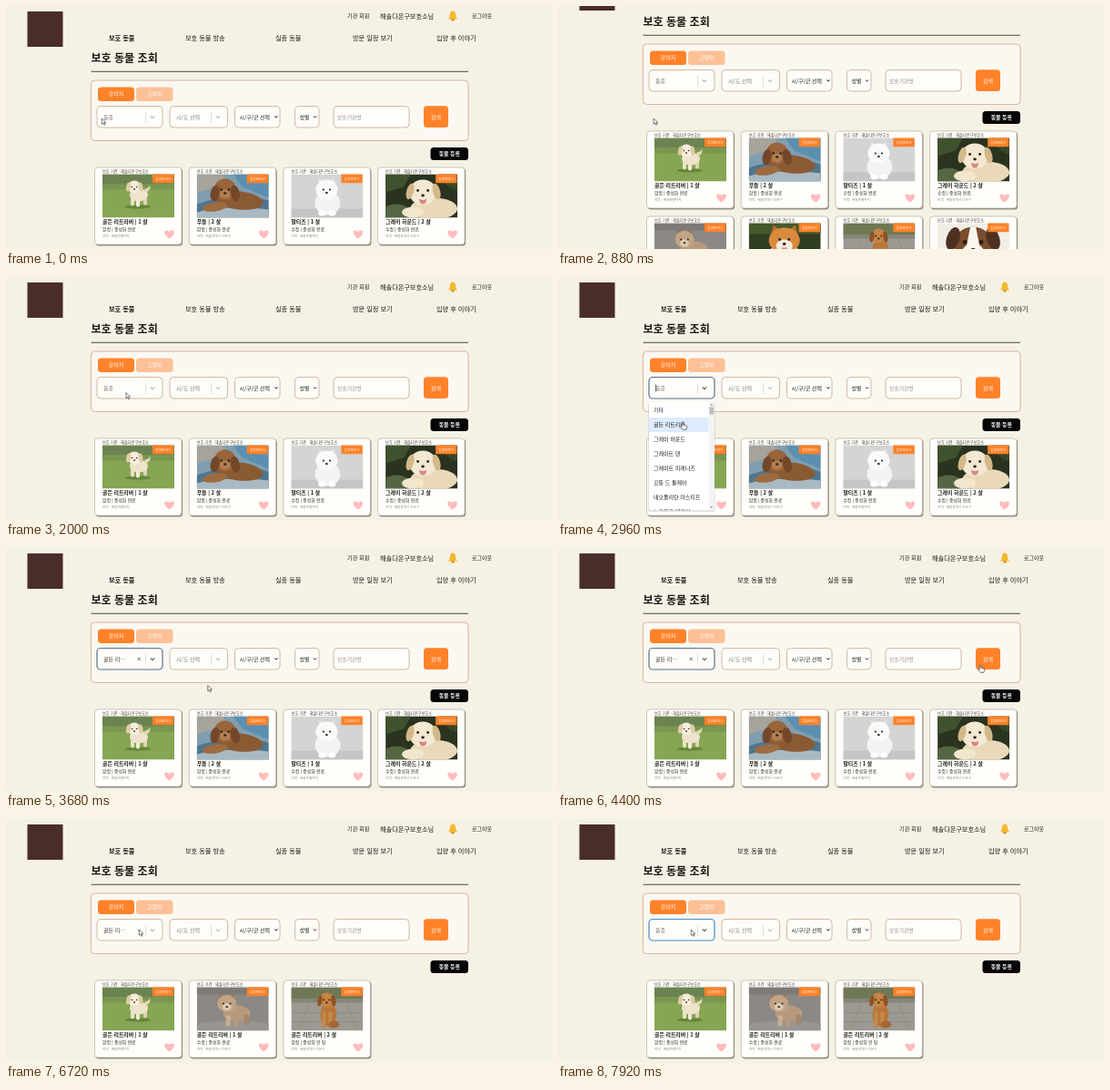
Recreate the animation shown at these times as an HTML page. Size 600 by 268 pixels, loop 8 s.

```html
<!DOCTYPE html>
<html lang="ko">
<head>
<meta charset="utf-8">
<title>보호 동물 조회</title>
<style>
  html, body { margin: 0; width: 100%; height: 100%; overflow: hidden; background: #f6f1e5; }
  svg { display: block; }
  text { font-family: "Noto Sans CJK KR", "Noto Sans CJK", "Noto Sans", sans-serif; white-space: pre; }
</style>
</head>
<body>
<svg id="stage" width="600" height="268" viewBox="0 0 600 268"></svg>
<script>
const ORANGE = '#ff8229', INK = '#1c1917', LINE = '#cdb09b', GRAY = '#85807b';
const SHELTER = '해솔다온구보호소';
const LOOP = 8000;

// --- markup helpers ---
const rect = (x, y, w, h, fill, r = 0, more = '') =>
  `<rect x="${x}" y="${y}" width="${w}" height="${h}" rx="${r}" fill="${fill}" ${more}/>`;
const oval = (x, y, rx, ry, fill, turn = 0) =>
  `<ellipse cx="${x}" cy="${y}" rx="${rx}" ry="${ry}" fill="${fill}" transform="rotate(${turn} ${x} ${y})"/>`;
const path = (d, fill, more = '') => `<path d="${d}" fill="${fill}" ${more}/>`;
// y is the vertical middle of the line
const text = (x, y, size, str, fill = INK, weight = 400, anchor = 'start') =>
  `<text x="${x}" y="${y + size * 0.36}" font-size="${size}" fill="${fill}" font-weight="${weight}" text-anchor="${anchor}">${str}</text>`;
const group = (id, body) => `<g id="${id}">${body}</g>`;
const box = (x, w, id = '') =>
  rect(x, 110.5, w, 23.5, '#fffdf9', 4, `stroke="${LINE}" stroke-width=".9" ${id && `id="${id}"`}`);
const chevron = (x, y, s, color, width = 1, id = '') =>
  path(`M${x - s} ${y - s / 2}l${s} ${s}l${s} ${-s}`, 'none', `stroke="${color}" stroke-width="${width}" ${id && `id="${id}"`}`);
const bar = x => rect(x, 117, 0.6, 12, '#cfcac4');
const face = (x, y, gap, s, nose = '#2a211c') =>
  oval(x - gap, y, s, s, '#2a211c') + oval(x + gap, y, s, s, '#2a211c') +
  oval(x, y + gap, s * 1.3, s, nose);

// --- pictures, 79 x 48 ---
const art = {
  lawn: rect(0, 0, 79, 48, '#86a653') + rect(0, 0, 79, 11, '#6b8350') + rect(0, 11, 79, 6, '#7a9650') +
    oval(39, 36, 14, 2, '#64863a') +
    rect(31, 24, 4, 11, '#eadfc6', 2) + rect(37, 25, 4, 11, '#f3ead8', 2) + rect(45, 23, 4, 11, '#e2d4b6', 2) +
    oval(40, 23, 10, 7, '#eee3cb') + path('M48 20q6-3 4-8q-1 4-6 4z', '#e6d8ba') +
    oval(35, 14, 7, 7, '#f6eddc') + oval(28.5, 14, 2.4, 5, '#dfcca6', 12) + oval(42, 14, 2.4, 5, '#dfcca6', -12) +
    face(35, 14, 2.6, 0.8),
  sofa: rect(0, 0, 79, 48, '#7f9eb0') + path('M0 0h30v12L0 20z', '#a6a39a') + path('M40 0h39v26L50 14z', '#5b8fb0') +
    path('M0 33q40-14 79-4v19H0z', '#4d7690') + path('M0 42q30-8 79-3v9H0z', '#a9b9c2') +
    oval(47, 29, 26, 10, '#8a5a33', 6) + oval(20, 36, 14, 5, '#9d6b40', -8) +
    oval(31, 17, 12, 12, '#9a653a') + oval(20, 21, 5, 9, '#75472a', 12) + oval(42, 21, 5, 9, '#75472a', -12) +
    oval(31, 22, 6, 5, '#b27d50') + face(31, 17, 4, 1.2),
  studio: rect(0, 0, 79, 48, '#d3d4d4') + rect(0, 38, 79, 10, '#c4c5c5') +
    path('M29 13l2-9l7 5zM49 13l-2-9l-7 5z', '#e9e7e4') +
    oval(40, 32, 14, 13, '#f4f3f1') + oval(39, 17, 12, 11, '#fbfaf8') +
    oval(34, 43, 4, 3, '#fff') + oval(45, 43, 4, 3, '#fff') + face(39, 17, 3.6, 1.1),
  garden: rect(0, 0, 79, 48, '#29331f') + path('M0 0h28l-8 14L0 20z', '#40512e') +
    path('M0 36q14-7 26 2v10H0z', '#566642') + path('M60 0h19v18q-12-2-19-18z', '#384726') +
    oval(53, 38, 26, 12, '#e9d9ba') + oval(30, 42, 12, 6, '#f2e6cd') +
    oval(41, 20, 15, 14, '#f3e8d2') + oval(27, 19, 4, 9, '#d3b888', 16) + oval(56, 19, 4, 9, '#d3b888', -16) +
    face(41, 18, 5.5, 1.4) + path('M37 27q4 3 8 0q0 6-4 6t-4-6z', '#d98684'),
  road: rect(0, 0, 79, 48, '#8b8886') + rect(0, 0, 79, 8, '#7d7a78') + path('M0 40q40-6 79 0v8H0z', '#979492') +
    oval(44, 29, 15, 9, '#b79a7c') + rect(32, 31, 5, 12, '#c9ae90', 2) + rect(40, 33, 5, 11, '#b79a7c', 2) +
    rect(52, 30, 5, 12, '#a4866a', 2) + path('M24 12l3-5l5 4zM42 12l-2-5l-6 4z', '#957459') +
    oval(33, 18, 10.5, 9.5, '#c2a384') + oval(33, 22, 5, 4, '#ddc9b2') + face(33, 18, 3.8, 1),
  hedge: rect(0, 0, 79, 48, '#303d22') + rect(0, 0, 79, 12, '#46592d') + path('M0 34h79v14H0z', '#4d5a33') +
    path('M24 14l3-12l9 7zM54 14l-3-12l-9 7z', '#bf6d26') +
    oval(39, 37, 18, 15, '#f1e5d4') + oval(39, 19, 17, 14, '#d98a3d') + oval(39, 25, 9, 7, '#f6eadb') +
    face(39, 18, 5, 1.4) + path('M36 27h6q0 6-3 6t-3-6z', '#df7f82'),
  path: rect(0, 0, 79, 48, '#9b9991') + rect(0, 0, 79, 13, '#6f7854') + rect(0, 13, 79, 4, '#86857a') +
    path('M0 28h79M0 38h79M20 17L8 48M60 17l12 31', 'none', 'stroke="#8b8982" stroke-width=".7"') +
    oval(41, 30, 9, 13, '#b9763c') + rect(34, 27, 4, 18, '#c68848', 2) + rect(41, 27, 4, 18, '#c68848', 2) +
    oval(47, 41, 6, 4, '#a66631') + oval(39, 14, 8, 8, '#c58445') +
    oval(31.5, 15, 2.6, 6, '#8d5327', 10) + oval(46.5, 15, 2.6, 6, '#8d5327', -10) + face(39, 14, 3, 0.9),
  close: rect(0, 0, 79, 48, '#f1eee8') + oval(40, 46, 28, 16, '#faf7f1') +
    oval(39, 24, 21, 20, '#7a4c2b') + oval(17, 17, 7, 13, '#4f3020', 18) + oval(61, 17, 7, 13, '#4f3020', -18) +
    path('M36 4h6l4 20q8 6 6 18H26q-2-12 6-18z', '#faf6ef') + face(39, 21, 9, 2.4)
};

const heart = (x, y) =>
  path(`M${x} ${y + 5}C${x - 9} ${y - 1} ${x - 5} ${y - 7} ${x} ${y - 2.5}C${x + 5} ${y - 7} ${x + 9} ${y - 1} ${x} ${y + 5}z`, '#ffbcbc');

function card(col, row, pic, name, info, area) {
  const x = 97.5 + col * 103.7, y = 178 + row * 94, left = x + 8.5;
  return rect(x + 1.1, y + 1.1, 95.5, 85.5, '#958c81', 3.5) +
    rect(x, y, 95.5, 85, '#fffefa', 3.5, 'stroke="#a99f93" stroke-width=".6"') +
    text(left, y + 4, 4.2, `보호 기관 : ${SHELTER}`, '#3d3935') +
    `<svg x="${left}" y="${y + 7.5}" width="79" height="48">${art[pic]}</svg>` +
    rect(left + 55, y + 7.5, 23.3, 9.8, ORANGE, 0.8) +
    text(left + 66.6, y + 12.4, 3.7, '입양문의 0', '#fff', 500, 'middle') +
    text(left, y + 60, 5.9, name, INK, 700) +
    text(left, y + 68.5, 4.85, info, '#2b2724', 500) +
    text(left, y + 75.5, 3.6, `지역 : ${area}`, '#8f8a84') +
    heart(x + 82, y + 73.5);
}

const NEUTER = '중성화 완료';
const first = card(0, 0, 'lawn', '골든 리트리버 | 1 살', `암컷 | ${NEUTER}`, '해솔특별자치');
const all = first +
  card(1, 0, 'sofa', '푸들 | 2 살', `암컷 | ${NEUTER}`, '해솔광역시 다온구') +
  card(2, 0, 'studio', '말티즈 | 1 살', `수컷 | ${NEUTER}`, '해솔특별자치') +
  card(3, 0, 'garden', '그레이 하운드 | 2 살', `수컷 | ${NEUTER}`, '해솔광역시 다온구') +
  card(0, 1, 'road', '골든 리트리버 | 1 살', `수컷 | ${NEUTER}`, '해솔광역시 다온구') +
  card(1, 1, 'hedge', '포메라니안 | 2 살', `암컷 | ${NEUTER}`, '해솔특별자치') +
  card(2, 1, 'path', '골든 리트리버 | 2 살', '암컷 | 중성화 안 됨', '해솔광역시 다온구') +
  card(3, 1, 'close', '비글 | 1 살', `수컷 | ${NEUTER}`, '해솔특별자치');
const found = first +
  card(1, 0, 'road', '골든 리트리버 | 1 살', `수컷 | ${NEUTER}`, '해솔광역시 다온구') +
  card(2, 0, 'path', '골든 리트리버 | 2 살', '암컷 | 중성화 안 됨', '해솔광역시 다온구');

const header =
  rect(23.5, 6, 39, 39, '#4a2d2a') +
  text(375, 11, 6.15, '기관 회원') + text(411, 11, 7.15, SHELTER + '님') +
  path('M485.5 14.5q2.4-1.5 2.4-5q.3-4 3.1-4t3.1 4q0 3.500 2.4 5z', '#f5b82e') + oval(491, 15.2, 1.6, 1.2, '#d08f1c') +
  text(512, 11, 6, '로그아웃') +
  [[113, '보호 동물', 700], [197, '보호 동물 방송'], [296, '실종 동물'], [381, '방문 일정 보기'], [473, '입양 후 이야기']]
    .map(([x, s, w = 500]) => text(x, 35, 7.2, s, INK, w)).join('') +
  text(93.5, 58, 12.05, '보호 동물 조회', INK, 700) + rect(93.5, 71.8, 414.5, 0.9, '#3b3734');

const filter =
  rect(93.5, 82, 414.5, 66.5, '#fbf8f2', 4, `stroke="${LINE}" stroke-width=".9"`) +
  rect(101, 89.5, 40, 15.5, ORANGE, 3.5) + text(121, 97.2, 6.1, '강아지', '#fff', 500, 'middle') +
  rect(143, 89.5, 40.5, 15.5, '#fdc096', 3.5) + text(163.2, 97.2, 6.1, '고양이', '#fff', 500, 'middle') +
  box(100, 72, 'breed') + text(107, 122.5, 6, '품종', GRAY).replace('<text', '<text id="hint"') +
  group('value', text(107, 122.5, 6, '골든 리…', '#332f2c') +
    path('M144.600 120.900l3.200 3.200m0-3.200l-3.200 3.200', 'none', 'id="clear" stroke-width=".9"')) +
  rect(107, 118.5, 0.6, 8, INK, 0, 'id="caret"') +
  bar(153.3) + chevron(161, 122.5, 2.2, '#b9b4ae', 1.1, 'arrow') +
  box(180, 63.5) + text(187, 122.5, 6, '시/도 선택', GRAY) + bar(225.3) + chevron(233, 122.5, 2.2, '#c4bfb9', 1.1) +
  box(251.5, 49.5) + text(256.5, 122.5, 5.9, '시/구/군 선택', INK, 500) + chevron(297, 122.3, 1.6, INK) +
  box(317.5, 26.5) + text(322.5, 122.5, 5.9, '성별', INK, 500) + chevron(339.5, 122.3, 1.6, INK) +
  box(360, 83) + text(364, 122.5, 5.8, '보호기관명', '#928d87') +
  rect(459, 110.3, 27, 23.7, ORANGE, 3.5) + text(472.5, 122.5, 6, '검색', '#fff', 500, 'middle') +
  rect(466.5, 156, 41.5, 14, '#050505', 3.5) + text(487.3, 163, 5.9, '동물 등록', '#fff', 700, 'middle');

const breeds = ['기타', '골든 리트리버', '그레이 하운드', '그레이트 덴', '그레이트 피레니즈', '꼬똥 드 툴레아', '네오폴리탄 마스티프', '노르포크 테리어'];
const menu =
  rect(99.2, 138.4, 73.2, 120, '#8d8780', 2, 'opacity=".45"') + rect(99.7, 138, 72, 119.5, '#fff', 2) +
  rect(99.7, 155, 66, 16, '#deebff', 0, 'id="pick"') +
  `<svg x="99.700" y="138" width="72" height="119.500">${breeds.map((s, i) => text(5.3, 9 + 16 * i, 6, s, INK, 500)).join('')}</svg>` +
  rect(165.7, 138, 6, 119.5, '#f3f3f3') + rect(166.4, 143.5, 4.6, 8, '#bdbdbd') +
  path('M167.300 141.500l1.400-1.800l1.400 1.800zM167.300 253l1.400 1.800l1.400-1.800z', '#8a8a8a');

const outline = 'stroke="#222" stroke-width=".6" stroke-linejoin="round"';
const pointer =
  group('arrowCur', path('M0 0v6.300l1.500-1.300l1 2.300l1.100-.5l-1-2.200h2z', '#fff', outline)) +
  group('handCur', path('M-.8 .6q.8-1 1.600 0v3l3.200 .8q.8 .3 .6 1.200l-.6 3.200h-4l-2.400-3.200q.2-1 1.600 0z', '#fff', outline)) +
  group('beamCur', path('M-1.200-3h2.400M0-3v6M-1.200 3h2.400', 'none', 'stroke="#222" stroke-width=".7"'));

const $ = id => document.getElementById(id);
$('stage').innerHTML =
  rect(0, 0, 600, 268, '#f6f1e5') +
  group('page', header + filter + group('all', all) + group('found', found) + group('menu', menu)) +
  group('pointer', pointer);

// --- motion: [time, ...values] ---
const scroll = [[640, 0], [720, 8], [800, 24], [880, 40], [960, 56], [1040, 62], [1200, 62], [1280, 56], [1360, 42], [1520, 24], [1600, 8], [1680, 0]];
const moves = [[0, 105.3, 124], [1760, 105, 124], [2000, 132, 127.5], [2320, 134, 126], [2480, 134, 126], [2880, 137, 159.5],
  [3440, 137, 159.5], [4160, 464, 128.5], [4880, 464, 128.5], [5360, 371.5, 134], [6320, 147, 122.5], [6560, 146.3, 122]];
const OPEN = 2400, CHOOSE = 3200, SEARCH = 4800, RESULT = 5200, CLEAR = 6960;

function at(table, t, ease = k => k) {
  const n = table.findIndex(row => row[0] > t);
  if (n === 0) return table[0].slice(1);
  if (n < 0) return table[table.length - 1].slice(1);
  const a = table[n - 1], b = table[n];
  const k = ease((t - a[0]) / (b[0] - a[0]));
  return a.slice(1).map((v, i) => v + (b[i + 1] - v) * k);
}
const smooth = k => k * k * (3 - 2 * k);
const show = (id, on) => $(id).setAttribute('display', on ? 'inline' : 'none');
const within = (t, from, to) => t >= from && t < to;

function tick(t) {
  const m = t % 400;
  return t - m + (m < 80 ? 0 : m < 160 ? 80 : m < 320 ? 160 : 320);
}

function draw(now) {
  const t = tick(now % LOOP);
  const [top] = at(scroll, t);
  const [x, y] = at(moves, t, smooth);
  const open = within(t, OPEN, CHOOSE);
  const chosen = within(t, CHOOSE, CLEAR);
  const focus = within(t, OPEN, SEARCH), again = t >= CLEAR;

  $('page').setAttribute('transform', `translate(0 ${-top})`);
  show('all', t < RESULT);
  show('found', t >= RESULT);
  show('menu', open);
  show('caret', open);
  show('hint', !chosen);
  show('value', chosen);
  $('pick').setAttribute('y', y > 155 ? 155 : 139);

  $('breed').setAttribute('stroke', again ? '#3f8ecb' : focus ? '#56708c' : LINE);
  $('breed').setAttribute('stroke-width', focus || again ? 1.2 : 0.9);
  $('arrow').setAttribute('stroke', focus || again ? '#5c5a58' : '#b9b4ae');
  $('clear').setAttribute('stroke', focus ? '#5c5a58' : '#b9b4ae');

  const hand = (open && y > 138) || x > 459;
  const beam = within(x, 360, 443) && y < 136;
  show('handCur', hand);
  show('beamCur', beam);
  show('arrowCur', !hand && !beam);
  $('pointer').setAttribute('transform', `translate(${x} ${y})`);
}

const start = performance.now();
function frame() {
  draw(performance.now() - start);
  requestAnimationFrame(frame);
}
frame();
</script>
</body>
</html>
```
